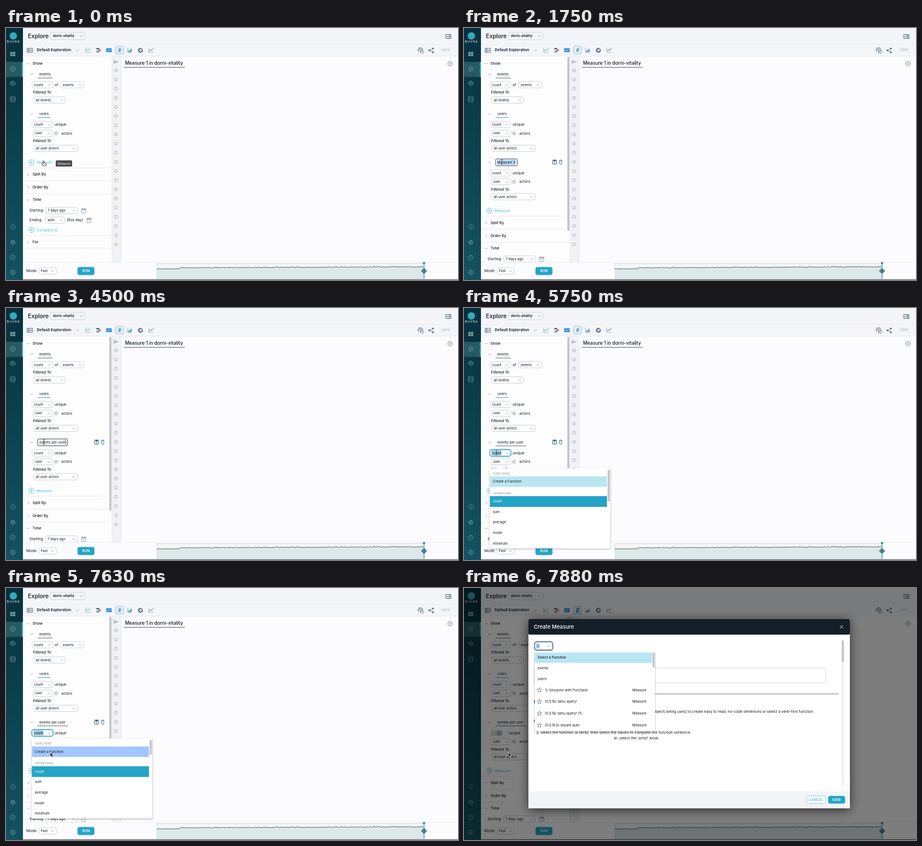
An HTML page that plays this animation: 800 by 446 pixels, repeating every 8000 ms.

```html
<!DOCTYPE html>
<html lang="en">
<head>
<meta charset="utf-8">
<title>Explore</title>
<style>
  html, body { margin: 0; width: 100%; height: 100%; overflow: hidden; background: #fcfcfe; }
  svg { display: block; width: 800px; height: 446px; }
  text { font-family: Inter, "Open Sans", sans-serif; white-space: pre; }
</style>
</head>
<body>
<svg id="stage" viewBox="0 0 800 446" xmlns="http://www.w3.org/2000/svg"></svg>
<script>
const LOOP = 8000, TICK = 125;
const INK = '#121820', LINK = '#4fc0df', BLUE = '#23a4c7', LINE = '#e6e8ed', SLATE = '#456274';
const ADDED = 375, TYPED = 2125, BLUR = 5375, OPEN = 5625, FLIP = 6250, HOVER = 6750, MODAL = 7750, READY = 7875;
const SHIFT = 85.7;

// Drawing helpers; y is the vertical centre of text and controls.
const text = (x, y, s, size = 6.5, more = '') =>
  `<text x="${x}" y="${y + size * .36}" font-size="${size}" fill="${INK}" ${more}>${s}</text>`;
const rect = (x, y, w, h, fill, more = '') =>
  `<rect x="${x}" y="${y}" width="${w}" height="${h}" fill="${fill}" ${more}/>`;
const circle = (x, y, r, fill, more = '') => `<circle cx="${x}" cy="${y}" r="${r}" fill="${fill}" ${more}/>`;
const path = (d, color = SLATE, width = .8, fill = 'none') =>
  `<path d="${d}" stroke="${color}" stroke-width="${width}" fill="${fill}"/>`;
const at = (x, y, body) => `<g transform="translate(${x} ${y})">${body}</g>`;
const span = (from, to, body) => `<g data-from="${from}" data-to="${to}">${body}</g>`;
const range = (n, f) => Array.from({ length: n }, (_, i) => f(i)).join('');

const down = (x, y, s = 2.2) => path(`M${x - s} ${y - s / 2}l${s} ${s} ${s} ${-s}`, '#75818d', .75);
const right = (x, y) => path(`M${x - 1} ${y - 2}l2 2-2 2`, '#75818d', .75);
const select = (x, y, w, label, more = '') =>
  rect(x, y - 5.6, w, 11.2, '#fff', `rx="3.4" stroke="#bcc4cd" stroke-width=".75" ${more}`) +
  text(x + 3.5, y - .1, label, 6.15) + down(x + w - 7, y + .2);
const info = (x, y) => circle(x, y, 2.5, 'none', `stroke="${SLATE}" stroke-width=".6"`) +
  path(`M${x} ${y - .4}v1.8M${x} ${y - 1.4}v.6`, SLATE, .6);
const plusLink = (y, label) => circle(45, y, 4.6, 'none', `stroke="${LINK}" stroke-width=".9"`) +
  path(`M42.6 ${y}h4.8M45 ${y - 2.4}v4.8`, LINK, .9) + text(54.3, y, label, 6.7, `style="fill:${LINK}"`);
const rule = y => rect(30, y, 157, .8, LINE);
const calendar = (x, y) => rect(x - 4, y - 3.5, 8, 8, '#e8edf0', 'stroke="#a4afb7" stroke-width=".7" rx=".8"') +
  rect(x - 4, y - 3.5, 8, 2.4, '#a4afb7') + path(`M${x - 2} ${y - 5}v2M${x + 2} ${y - 5}v2`, '#a4afb7');
const gear = (x, y, r, color) => circle(x, y, r, 'none', `stroke="${color}" stroke-width=".8"`) +
  circle(x, y, r + .9, 'none', `stroke="${color}" stroke-width="1" stroke-dasharray="1.5 ${(r + .9) * Math.PI / 4 - 1.5}"`) +
  circle(x, y, r * .38, 'none', `stroke="${color}" stroke-width=".7"`);
const beacon = (x, y, color) => path(`M${x - 2.8} ${y + 3}a4.2 4.2 0 1 1 5.6 0M${x - 1.4} ${y + 1}a2.1 2.1 0 1 1 2.8 0M${x} ${y}v5`, color, .9);
const star = (x, y, fill) => {
  const points = range(10, i => {
    const r = i % 2 ? 1.9 : 4.4, a = i * Math.PI / 5 - Math.PI / 2;
    return `${(x + r * Math.cos(a)).toFixed(2)},${(y + r * Math.sin(a)).toFixed(2)} `;
  });
  return `<polygon points="${points}" fill="${fill}" stroke="${SLATE}" stroke-width=".7"/>`;
};

function navigation() {
  const c = '#79a0a9';
  return rect(0, 0, 30, 446, 'url(#nav)') + rect(0, 60, 30, 26.5, '#275a65') + rect(28, 60, 2, 26.5, '#2ab0a8') +
    circle(13, 14, 6.5, '#38a8bd') +
    text(13.3, 24, 'BUVRA', 5.4, 'text-anchor="middle" letter-spacing="1" style="fill:#fff"') +
    range(4, i => rect(7.6 + i % 2 * 4.7, 42.4 + (i >> 1) * 4, 4, 3.3, c)) +
    circle(12, 72.5, 4.2, 'none', `stroke="${c}" stroke-width=".8"`) + path('M14 70.4l-1.3 2.8-2.8 1.3 1.3-2.8z', c, .7) +
    beacon(12, 98.5, c) +
    path('M8 122.8v6.4c0 2.4 8 2.4 8 0v-6.4M8 126c0 2.4 8 2.4 8 0M8 122.8c0-2.4 8-2.4 8 0s-8 2.4-8 0', c) +
    circle(12.5, 352, 4.3, 'none', `stroke="${c}" stroke-width=".7"`) + path('M12.5 351.3v3M12.5 349.4v.9', c) +
    gear(12, 379.3, 3, c) +
    circle(12, 406, 4.2, 'none', `stroke="${c}" stroke-width=".8"`) +
    text(12, 406, '?', 5.5, `text-anchor="middle" style="fill:${c}"`) +
    circle(12, 432.5, 4.2, 'none', `stroke="${c}" stroke-width=".8"`) + circle(12, 431.3, 1.4, 'none', `stroke="${c}" stroke-width=".7"`) +
    path('M9.3 435.5c.8-2.4 4.6-2.4 5.4 0', c, .7);
}

const panelIcon = (x, y) => rect(x - 4.5, y - 3.5, 9, 7, 'none', `stroke="${SLATE}" stroke-width=".9"`) +
  path(`M${x - 1.5} ${y - 3.5}v7M${x - 4} ${y - 1.2}h2M${x - 4} ${y + 1.2}h2M${x + 3.6} ${y}h-3.6l1.5-1.4M${x} ${y}l1.5 1.4`);

function header() {
  const chart = (x, color) => path(`M${x - 4} 35v8h8.5`, '#8a99a5', .7) + path(`M${x - 3} 41l2.4-3 2.2 1.6 3-3.8`, color, .9);
  return rect(30, 0, 770, 50, '#f3f5f9') + rect(30, 28, 770, .8, '#e9ecf1') + rect(30, 49.6, 770, .8, '#e3e6ec') +
    text(38.7, 14, 'Explore', 10.3, 'font-weight="500"') +
    rect(78.5, 7.5, 61.5, 13.2, '#f3f5f9', 'rx="3.5" stroke="#c5ccd5" stroke-width=".75"') +
    text(83, 13.9, 'dorni-vitality', 6.1, 'font-weight="600"') + down(133, 14.3) +
    at(1566, 0, `<g transform="scale(-1 1)">${panelIcon(783, 15)}</g>`) +
    panelIcon(42.2, 39.5) + text(54.5, 39, 'Default Exploration', 6.6, 'font-weight="600"') + down(126.5, 39.6) +
    chart(145, '#37b597') +
    range(3, i => rect(160 + i % 2 * 3, 35.6 + i * 2.8, 4.8, 1.9, ['#3c4853', '#d05a68', '#2a9d8a'][i])) +
    path('M159.5 37.5h8.5M160 41h8', SLATE, .5) +
    rect(177.3, 35.8, 9.8, 7, '#3194d8') + path('M178.5 40.8l2-2 2 1.3 3.2-2.5', '#fff', .7) +
    rect(194, 32.2, 14, 13.8, '#e2eef8', 'rx="3" stroke="#93b6cd" stroke-width=".8"') +
    span(0, MODAL, text(201, 39.2, '#', 8, 'text-anchor="middle" font-weight="600" font-style="italic" style="fill:#2c6f9d"')) +
    span(MODAL, LOOP, path('M199.8 36h4l-1.5 7h-3.8z', '#2c6f9d', .9, '#8fb8d2')) +
    path('M215 35v8h8', '#8a99a5', .7) + range(3, i => rect(216.2 + i * 2.3, 40 - i * 1.6, 1.6, 2.7 + i * 1.6, '#318fd0')) +
    circle(238, 39.4, 3.2, 'none', 'stroke="#2d5b9c" stroke-width="2"') + path('M238 36.2a3.2 3.2 0 0 1 3.2 3.2', '#e08a56', 2) +
    chart(256.5, '#3f6d8a') +
    beacon(733.5, 39, SLATE) + circle(737, 42.5, 2.2, '#f3f5f9', `stroke="${SLATE}" stroke-width=".7"`) +
    path('M756 36.2l-6.5 3.4 6.5 3.4') + range(3, i => circle([755.5, 749.3, 755.5][i], 36.2 + i * 3.4, 1.5, SLATE)) +
    text(771, 39.2, 'SAVE', 6, 'style="fill:#aeb5bd"');
}

// The two rows of controls shared by the user measures.
const userRows = () => text(86, 171, 'unique') + select(48, 186.3, 35, 'user') + info(88.5, 186.3) + text(98, 186.3, 'actors') +
  text(47.8, 199.7, 'Filtered To', 6.4, 'font-style="italic" font-weight="500"') + select(49, 213, 77.5, 'all user actors');

function addedMeasure() {
  const y = 256.5;
  const icons = rect(156.6, 233.6, 7.4, 7.4, 'none', `rx="1" stroke="${SLATE}" stroke-width="1"`) +
    rect(158.2, 234, 4.2, 2.2, SLATE) + path('M160.3 236.8v3M158.8 238.4h3', '#2c9a84') +
    path('M168 235h6M169.6 235v-1.3h2.8v1.3M168.7 235.4l.3 5.6h4l.3-5.6');
  const edit = rect(56, 231.8, 38, 12, '#fff', 'id="box" rx="1.5" stroke="#2b333c" stroke-width=".9"') +
    span(1000, TYPED, rect(58.6, 233.5, 33, 8.8, '#b3d4fc')) +
    text(59, 237.5, 'Measure 3', 6.3, 'id="name"') + rect(80, 233.5, .7, 8.2, INK, 'id="caret"');
  const done = text(59, 237.5, 'events per user', 6.3) + rect(56, 243.6, 54, .8, '#3b444e');
  const focus = rect(45.7, y - 6, 37.6, 12, 'none', `rx="3.8" stroke="${BLUE}" stroke-width="1.3"`) +
    rect(49, y - 4.3, 17.2, 8.6, '#9fc8e4') + text(49.5, y - .1, 'count', 6.15);
  const pill = rect(47, y - 5.2, 22, 10.6, '#dcdfe3', 'rx="4"') + text(52, y - 1, '...', 6) +
    circle(62, y + .5, 4, '#9aa1a8') + path(`M60.6 ${y - .9}l2.8 2.8m0-2.8l-2.8 2.8`, '#fff', .7);
  return down(45.5, 237.8) + icons + span(ADDED, BLUR, edit) + span(BLUR, LOOP, done) +
    span(ADDED, MODAL, select(46, y, 37, 'count') + text(86, y, 'unique')) +
    span(5500, MODAL, focus) + span(MODAL, LOOP, pill + text(79, y, 'unique')) +
    at(0, SHIFT, userRows().replace(/<text.*?<\/text>/, ''));
}

function sidebar() {
  const section = (y, label, mark = right) => mark(39.5, y) + text(47, y - .2, label, 6.6, 'font-weight="500"');
  const lower = plusLink(237.8, 'Measure') + rule(247) + section(259.3, 'Split By') + rule(270) +
    section(282, 'Order By') + rule(293) + section(304.3, 'Time', down) +
    text(41.5, 323, 'Starting', 6.5) + select(70, 323, 57, '7 days ago') + calendar(137.5, 323.3) +
    text(41.5, 340, 'Ending', 6.5) + select(70, 340, 34.5, 'auto') + text(107.3, 339.7, '(this day)', 6.6) + calendar(147, 340.3) +
    plusLink(357.2, 'Compare to') + rule(367) + section(379, 'For') + rule(389);
  return `<g clip-path="url(#side)">` + rect(30, 50, 157, 366, '#fdfdfe') + section(63, 'Show', down) +
    down(45.5, 82) + text(59, 81.5, 'events', 6.4) + rect(56, 88, 26.5, .8, '#4a545e') +
    select(46, 100.4, 37, 'count') + text(86, 100.2, 'of') + select(97, 100.4, 41, 'events') +
    text(47.8, 114, 'Filtered To', 6.4, 'font-style="italic" font-weight="500"') + select(49, 127.5, 56.5, 'all events') +
    down(45.5, 152.6) + text(59, 152, 'users', 6.4) + rect(56, 158, 22.5, .8, '#398a98') + select(46, 170.8, 37, 'count') + userRows() +
    `<g id="lower">${lower}</g>` + span(ADDED, LOOP, addedMeasure()) +
    span(ADDED, LOOP, rect(181.3, 50, 6, 366, '#fdfdfe') + rect(183, 51, 3.4, 308, '#bfc3c8', 'rx="1.6"')) + '</g>';
}

function canvasArea() {
  return rect(187, 50, 16.5, 366, '#f0f2f6') + rect(187, 50, .7, 366, '#dfe3e9') + rect(203, 50, .7, 366, '#dfe3e9') +
    path('M191.5 56.5v7M198.5 60h-5.5l2-2M193 60l2 2', '#66727e') +
    range(20, i => circle(194.8, 75 + i * 16.2, 2.5, '#fbfcfd', 'stroke="#7c8a98" stroke-width=".75"')) +
    text(210.8, 62.5, 'Measure 1 in dorni-vitality', 8.3, 'font-weight="500"') + rect(208, 69.2, 108.5, .9, '#4a545e') +
    gear(786, 63, 3.6, '#8a97a3');
}

function footer() {
  let seed = 7;
  const noise = () => (seed = seed * 16807 % 2147483647) / 2147483647 - .5;
  let trend = '';
  for (let x = 267; x <= 741; x++) {
    const y = (x < 308 ? 426.2 : 424.3 - (x - 308) * .0042) + noise() * 1.4;
    trend += `${trend ? 'L' : 'M'}${x} ${y.toFixed(1)}`;
  }
  return rect(30, 414.5, 770, 32, '#fcfcfe') + rect(30, 414.5, 770, .8, '#e6e9ee') +
    text(36, 429.8, 'Mode:', 6.6) + select(58, 430, 31.5, 'Fast') +
    rect(126.5, 423, 30, 14.2, '#23a4c7', 'rx="3.5" stroke="#8bcfe0" stroke-width=".8"') +
    text(141.6, 430, 'RUN', 6.2, 'text-anchor="middle" font-weight="600" style="fill:#fff"') +
    rect(267, 417, 474, 27, '#f4f7f8', 'stroke="#b9cbd0" stroke-width=".7"') +
    `<path d="${trend}V444H267z" fill="#dce8ea"/>` + path(trend, '#4b555c', .9) +
    rect(738.6, 415, 2.4, 29, '#8fc4d0') + rect(738, 414.5, 3.8, 3, '#247f98') +
    path('M739.2 426l-4.2 4 4.2 4zM740.6 426l4.2 4-4.2 4z', '#1d4c5c', .8, '#4a9db0') +
    rect(0, 444.7, 800, 1.3, '#6c7479');
}

function operations() {
  const label = (y, s) => text(51.5, y, s, 4.9, 'letter-spacing=".1" style="fill:#7d8790"');
  const rows = ['sum', 'average', 'mode', 'minimum'];
  const list = rect(45.5, 283.7, 213.5, 141.7, '#fff', 'filter="url(#shadow)"') +
    label(293, 'FUNCTIONS') + rect(45.8, 298, 207.2, 18.6, '#bae6f2', 'id="create"') + text(51, 307.2, 'Create a Function', 6.1) +
    label(328.2, 'OPERATIONS') + rect(45.8, 333, 207.2, 19, BLUE) + text(51, 342, 'count', 6.1, 'style="fill:#fff"') +
    rows.map((s, i) => text(51, 360.7 + i * 18.6, s, 6.1)).join('') +
    rect(254.2, 286, 4, 57, '#c4c7cb', 'id="thumb" rx="1.8"');
  return span(OPEN, MODAL, `<g id="list">${list}</g>`);
}

function modal() {
  const dialog = rect(114, 55, 569, 335, '#fff', 'rx="2" filter="url(#lift)"') + rect(114, 55, 569, 27.5, '#151e28', 'rx="2"') +
    text(123.5, 69, 'Create Measure', 9.3, 'font-weight="500" style="fill:#fff"') + path('M665.2 66l6 6m0-6l-6 6', '#c9ced3', .9) +
    rect(124, 141.8, 516, 26, '#fff', 'rx="2.5" stroke="#ccd1d7" stroke-width=".8"') + rect(124, 187, 539, .9, '#70787f') +
    text(123.5, 201.5, 'How to create', 8, 'font-weight="700"') +
    text(619.7, 219, '1. Choose a noun (object) being used, to create easy to read, no-code sentences or select a verb-first function.', 6.5, 'text-anchor="end"') +
    text(123.5, 235, 'for example', 7, 'font-weight="600"') +
    text(128, 255.2, '2. select the function (a verb); then select the values to complete the function sentence.', 6.6) +
    text(265.5, 265.5, "ie: select the 'artist' knob", 6.6) +
    rect(668.3, 92, 4.4, 258, '#eff0f2') + rect(668.6, 93, 3.8, 38, '#c2c6cb', 'rx="1.8"') +
    rect(114, 360, 569, 30, '#f2f4f8') +
    rect(606, 368, 34, 13.4, '#fff', 'rx="3.5" stroke="#7cc6da" stroke-width=".8"') +
    text(623, 374.7, 'CANCEL', 6.1, `text-anchor="middle" style="fill:${BLUE}"`) +
    rect(644.5, 368, 30, 13.4, BLUE, 'rx="3.5"') + text(659.5, 374.7, 'SAVE', 6.1, 'text-anchor="middle" font-weight="600" style="fill:#fff"');
  const options = (rows, fill) => rows.map(([name, kind], i) => {
    const y = 180.8 + i * 20.7;
    return star(133.5, y, fill) + text(143, y - .2, name, 6.1) + text(323, y - .2, kind, 6.1, 'text-anchor="end"');
  }).join('');
  const field = rect(124.7, 94.8, 32.6, 15.4, '#fff', 'rx="4.5" stroke="#526675" stroke-width="1.4"') +
    rect(126.2, 96.3, 29.6, 12.4, '#fff', 'rx="3.2" stroke="#8ccbe0" stroke-width=".9"') +
    rect(128, 98.5, 5.6, 8, '#8dc0ee') + text(128.3, 101.8, '...', 6) + down(149.5, 102.8);
  const menu = rect(125, 112.5, 213, 141, '#fff', 'filter="url(#shadow)"') + rect(125.2, 114.3, 207.8, 18.2, '#b9e6f4') +
    text(130.3, 123.2, 'Select a Function', 6.1, 'font-style="italic" font-weight="500"') +
    text(130.3, 142, 'events', 6.1) + text(130.3, 160.4, 'users', 6.1) + rect(333.8, 114, 3.6, 27, '#c2c6cb', 'rx="1.7"') +
    span(MODAL, READY, options([['user', 'Actor'], ['uuid', 'Actor'], ['timestamp', 'Time'], ['category', 'Raw Data']], SLATE)) +
    span(READY, LOOP, options(['% Sessions with Purchase', '(5.0.16) tamu query!', '(5.0.16) tamu query! (1)', '(5.0.16.0) wizard quer']
      .map(name => [name, 'Measure']), '#fff'));
  return span(MODAL, LOOP, rect(0, 0, 800, 446, '#000', 'id="shade"') + `<g id="dialog">${dialog + field}</g>` + menu);
}

function pointer() {
  const beam = 'M-2-4.5c1.2 0 2 .4 2 1.2v6.6c0 .8-.8 1.2-2 1.2M2-4.5c-1.2 0-2 .4-2 1.2M2 4.5c-1.2 0-2-.4-2-1.2M-1.2 .8h2.4';
  const hand = 'M-1.4-4.2c0-1.3 1.6-1.3 1.6 0v3l2.9.7c.9.2 1.2.8 1.1 1.6l-.6 2.9H-1L-3.5 .9c-.6-1 .6-1.7 1.3-.9l.8.8z';
  return '<g id="pointer">' + span(0, ADDED, path(hand, '#111', .8, '#fff')) +
    span(ADDED, HOVER - 250, path(beam, '#fff', 1.8) + path(beam, '#111', .9)) +
    span(HOVER - 250, LOOP, path('M0 0v7.6l1.8-1.6 1.2 2.8 1.3-.6-1.2-2.7h2.4z', '#fff', .6, '#000')) + '</g>';
}

const defs = `<defs>
  <linearGradient id="nav" x2="0" y2="1"><stop stop-color="#07303d"/><stop offset=".5" stop-color="#0d4350"/><stop offset="1" stop-color="#145261"/></linearGradient>
  <clipPath id="side"><rect x="30" y="50" width="157" height="365"/></clipPath>
  <filter id="shadow" x="-10%" y="-10%" width="120%" height="120%"><feDropShadow dx="0" dy="1" stdDeviation="1.8" flood-opacity=".35"/></filter>
  <filter id="lift" x="-10%" y="-15%" width="120%" height="130%"><feDropShadow dx="0" dy="3" stdDeviation="9" flood-opacity=".65"/></filter>
</defs>`;
const tooltip = span(0, 250, rect(88, 234.2, 29, 11, '#4b4d50', 'rx="1.5"') +
  text(102.6, 239.7, 'Measure', 5.3, 'text-anchor="middle" style="fill:#fff"'));

const stage = document.getElementById('stage');
stage.innerHTML = defs + rect(0, 0, 800, 446, '#fcfcfe') + header() + canvasArea() + sidebar() + footer() + navigation() +
  tooltip + operations() + modal() + pointer();

const $ = id => document.getElementById(id);
const timed = [...stage.querySelectorAll('[data-from]')];
const keystrokes = [[2125, 1], [2250, 2], [2500, 3], [2625, 4], [2875, 5], [3000, 6], [3125, 7], [3250, 8],
  [3375, 9], [3500, 10], [3625, 11], [3750, 12], [3875, 14], [4125, 15]];
const moves = [[0, 67, 240], [250, 67, 240], [375, 67, 237], [4500, 67, 237], [5250, 57.5, 256],
  [6250, 57.5, 256], [6875, 78.5, 291], [LOOP, 78.5, 291]];

function pointerAt(t) {
  const i = moves.findIndex(([end]) => t < end);
  const [t0, x0, y0] = moves[i - 1], [t1, x1, y1] = moves[i];
  const p = (t - t0) / (t1 - t0), e = p * p * (3 - 2 * p);
  return `translate(${x0 + (x1 - x0) * e} ${y0 + (y1 - y0) * e})`;
}

function typeName(t) {
  const count = keystrokes.reduce((n, [time, length]) => t >= time ? length : n, 0);
  const name = $('name');
  name.textContent = count ? 'events per user'.slice(0, count) : 'Measure 3';
  const width = name.getComputedTextLength();
  $('box').setAttribute('width', width + 6.6);
  $('caret').setAttribute('x', 59.2 + width);
  $('caret').style.display = count ? '' : 'none';
}

const start = performance.now();
function draw() {
  const t = Math.floor((performance.now() - start) % LOOP / TICK) * TICK;
  for (const el of timed) el.style.display = t >= +el.dataset.from && t < +el.dataset.to ? '' : 'none';
  if (t >= ADDED && t < BLUR) typeName(t);
  $('lower').setAttribute('transform', `translate(0 ${t < ADDED ? 0 : SHIFT})`);
  $('list').setAttribute('transform', `translate(0 ${t < FLIP ? 0 : -17.5})`);
  $('thumb').setAttribute('height', t < FLIP ? 57 : 27);
  $('create').setAttribute('fill', t < HOVER ? '#bae6f2' : '#a3c7fd');
  $('shade').setAttribute('opacity', t < READY ? .4 : .5);
  $('dialog').setAttribute('opacity', t < READY ? .68 : 1);
  $('pointer').setAttribute('transform', pointerAt(t));
  $('pointer').style.display = t >= TYPED && t < 4500 ? 'none' : '';
  requestAnimationFrame(draw);
}
draw();
</script>
</body>
</html>
```
